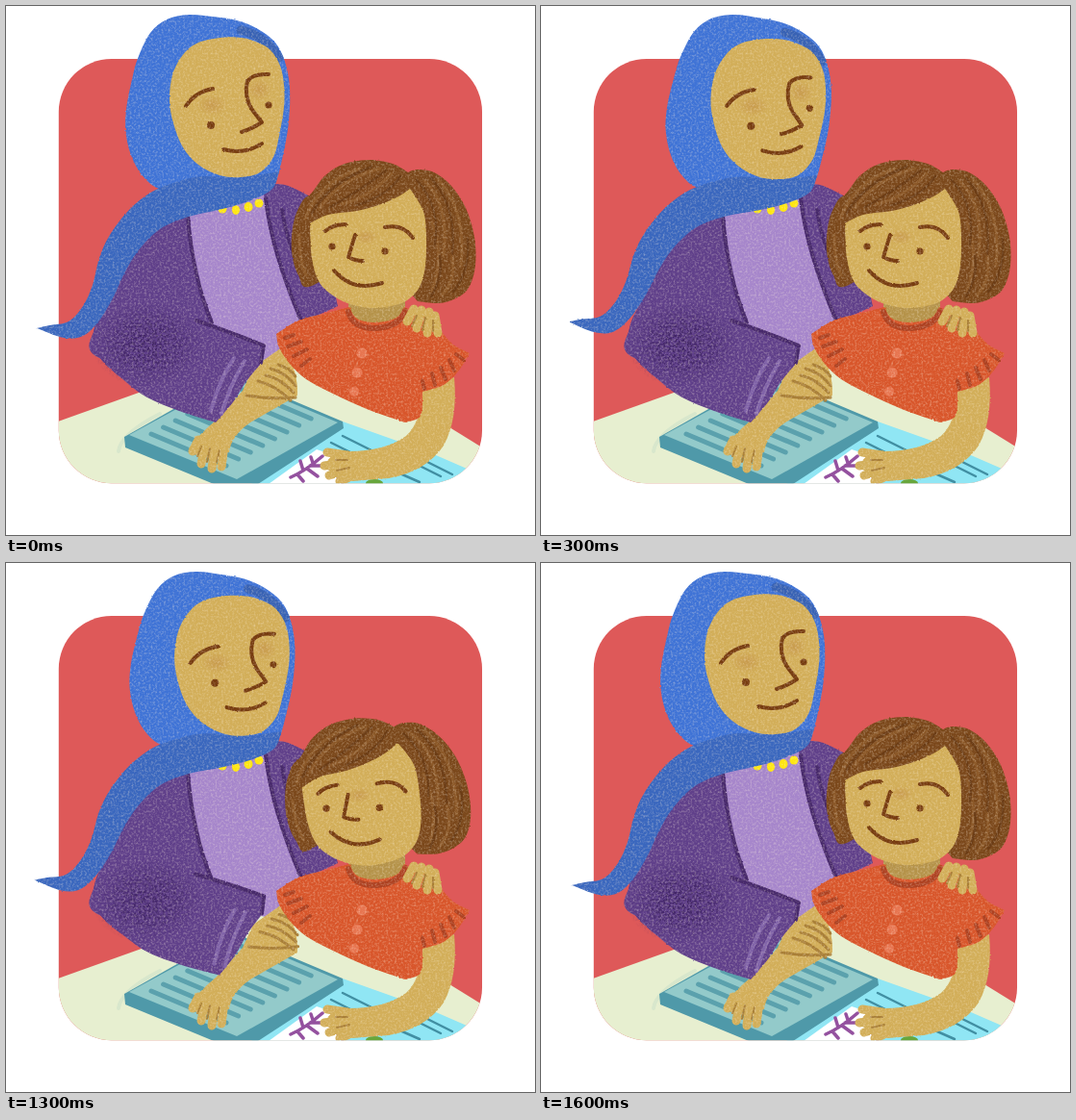
Write an HTML page that moves like this. It is 550x550 px and loops after 2900 ms.

```html
<!DOCTYPE html>
<html lang="en">
<head>
<meta charset="utf-8">
<title>Reading together</title>
<style>
html, body { margin: 0; height: 100%; overflow: hidden; background: #fff; }
svg { display: block; width: 550px; height: 550px; }
.line { fill: none; stroke-width: 4; stroke-linecap: round; stroke-linejoin: round; }
.skin { fill: #d2ae59; }
.finger { stroke: #d2ae59; stroke-width: 9; }
.ink { stroke: #773c10; }
.dot { fill: #773c10; }
.fold { stroke: #a97f37; stroke-width: 3; }
.jacket { fill: #60408a; }
.seam { stroke: #47296b; stroke-width: 4; }
.hair { fill: #7b481b; }
.strand { stroke: #8c5929; stroke-width: 3; }
.shade { stroke: #6b3c15; stroke-width: 2.5; }
.teal { stroke: #5ba1ad; stroke-width: 5; }
.pleat { stroke: #ae4222; stroke-width: 4; }
</style>
</head>
<body>
<svg viewBox="0 0 550 550">
  <defs>
    <clipPath id="card"><rect x="54.8" y="55" width="440.2" height="441.2" rx="55"/></clipPath>
    <filter id="grain" filterUnits="userSpaceOnUse" x="0" y="0" width="550" height="550" color-interpolation-filters="sRGB">
      <feTurbulence type="fractalNoise" baseFrequency=".45" numOctaves="2" seed="4" result="noise"/>
      <feDisplacementMap in="SourceGraphic" in2="noise" scale="2" xChannelSelector="R" yChannelSelector="G" result="art"/>
      <feColorMatrix in="noise" values="0 0 0 0 1  0 0 0 0 .95  0 0 0 0 .88  .8 0 0 0 -.36"/>
      <feComposite in2="art" operator="atop"/>
    </filter>
    <filter id="speck" filterUnits="userSpaceOnUse" x="0" y="0" width="550" height="550" color-interpolation-filters="sRGB">
      <feTurbulence type="fractalNoise" baseFrequency=".4" numOctaves="2" seed="9"/>
      <feColorMatrix values="0 0 0 0 0  0 0 0 0 0  0 0 0 0 0  5 0 0 0 -2.1" result="dots"/>
      <feComposite in="SourceGraphic" in2="dots" operator="in"/>
    </filter>
    <radialGradient id="dusk"><stop stop-color="#3d2162"/><stop offset=".5" stop-color="#3d2162" stop-opacity=".7"/><stop offset="1" stop-color="#3d2162" stop-opacity="0"/></radialGradient>
    <radialGradient id="blush"><stop stop-color="#b97f3d" stop-opacity=".4"/><stop offset="1" stop-color="#b97f3d" stop-opacity="0"/></radialGradient>
  </defs>

  <g clip-path="url(#card)">
    <path fill="#de5959" d="M54 55H495V497H54z"/>
    <path fill="#e7efd0" d="M54 432L138 402 300 345 440 425 495 459V497H54z"/>

    <!-- books -->
    <path class="line" stroke="#d8e7cc" stroke-width="6" d="M117 463Q119 445 160 424"/>
    <path fill="#90e6f4" d="M350 432L440 464 486 484 478 497H255z"/>
    <path class="line" stroke="#418fa3" style="stroke-width:2.5" d="M350 447L386 465M338 454L362 466M402 459L432 471M418 472L452 489M430 470L464 487M405 484L430 495"/>
    <path fill="#fff" d="M323 461L368 476 352 497H273z"/>
    <path class="line" stroke="#94519f" style="stroke-width:3.5" d="M296 490Q312 483 329 468M309 483L306 473M316 478L330 478M303 487L309 494M319 475L317 469M313 481L324 489M344 488L350 495"/>
    <ellipse cx="383" cy="496" rx="9" ry="4" fill="#68a63c"/>
    <path fill="#4f99a9" d="M123 448L236 384 350 432 351 439 262 497H216L124 459z"/>
    <path fill="#93caca" d="M128 446L236 387 345 433 240 492z"/>
    <path id="rows" class="line teal"/>
  </g>

  <g filter="url(#grain)">
    <!-- woman: body -->
    <g clip-path="url(#card)">
      <path fill="#a686cb" d="M178 204L272 192 292 270 318 334 285 372 200 350z"/>
      <path class="jacket" data-through="264,186! 290,186 318,199! 332,250 345,312! 308,329! 285,270 270,202!"/>
      <path class="line seam" d="M270 200Q276 255 307 327M287 212Q292 245 304 268"/>
      <path class="jacket" data-through="189,212! 152,226 124,262 105,305 92,335 95,365 190,390! 214,330! 197,282 189,218!"/>
      <path class="line seam" d="M189 218Q194 282 214 329"/>
      <g fill="#ffe610"><circle cx="225" cy="211" r="4.5"/><ellipse cx="239" cy="212" rx="4" ry="5"/><ellipse cx="252" cy="209" rx="4.5" ry="5"/><circle cx="263" cy="205" r="4.5"/></g>

      <path class="skin" d="M288 354Q304 378 303 405Q280 418 254 433Q234 447 232 464L200 469 190 460Q202 444 218 431L246 400 257 376z"/>
      <path class="line finger" d="M200 451L194 463M207 455L203 476M217 457L214 481M227 457L224 479"/>
      <path class="line fold" style="stroke-width:2" d="M203 458L199 468M212 460L209 474M222 462L219 474"/>
      <g id="sleeve">
        <path class="jacket" data-through="120,285! 102,312 92,335 91,352 100,369 120,387 145,406 180,421 218,433! 236,412 250,390 265,372! 268,352! 240,342 210,330 190,300!"/>
        <ellipse cx="147" cy="352" rx="58" ry="44" fill="url(#dusk)" filter="url(#speck)"/>
        <path class="line" stroke="#8063a8" stroke-width="3" d="M237 366Q222 388 213 421M248 369Q233 394 224 424"/>
        <path class="line seam" d="M198 327Q230 338 268 353L265 371"/>
        <path class="line fold" d="M250 405Q275 409 301 407M262 390Q281 395 296 410M270 384Q285 387 299 402M275 377Q291 381 301 395M283 373Q294 376 301 385"/>
      </g>
    </g>

    <!-- woman: head and scarf -->
    <g id="head">
      <path fill="#3f73d6" data-through="132,72 138,52 150,28 167,14 190,9 215,11 240,15 262,24 280,38 290,58 295,85 294,120 288,155 280,182 262,196 220,202 165,192 145,180 132,160 125,135 125,108"/>
      <path fill="#3a67be" data-through="284,172! 277,190 255,202 225,211 190,219 160,232 137,255 122,280 112,302 97,327 80,343 60,345 32,335! 45,332 65,328 80,312 90,290 97,262 108,238 128,212 152,193 180,182 205,177 245,178"/>
      <path class="line" stroke="#3862b4" style="stroke-width:9" d="M244 25Q270 31 284 54"/>
      <path class="skin" data-through="170,98 173,72 183,52 198,39 222,33 245,33 262,38 275,46 285,62 289,82 289,105 284,135 278,157 264,173 244,178 222,176 200,165 184,147 174,122"/>
      <ellipse cx="214" cy="103" rx="16" ry="11" fill="url(#blush)"/>
      <ellipse cx="263" cy="87" rx="13" ry="12" fill="url(#blush)"/>
      <path class="line ink" d="M187 104Q197 89 215 86M273 71Q257 70 251 78Q247 94 256 108L266 121Q255 128 245 131M226 149Q248 155 266 143"/>
      <circle class="dot" cx="213" cy="124" r="4"/><circle class="dot" cx="273" cy="103" r="3.5"/>
    </g>

    <!-- girl: body -->
    <g clip-path="url(#card)">
      <path class="skin" d="M430 397L466 386Q470 430 455 457Q437 484 398 491L360 494 332 481Q333 466 352 463Q392 464 416 447Q434 430 430 397z"/>
      <path class="line finger" d="M355 467L334 464M352 475L331 478M357 482L336 488M365 487L347 494"/>
      <path class="line fold" style="stroke-width:2" d="M343 472L355 472M344 483L357 480"/>
      <path fill="#b5934a" d="M356 295H415V332H356z"/>
      <path fill="#d8562b" data-through="357,313! 330,320 304,327 281,341! 284,355 295,372 312,388 340,403 375,419 415,433! 431,426 433,401! 455,394 470,380 482,361! 465,352 452,338 441,325 414,313! 406,324 385,329 365,325"/>
      <path class="line pleat" style="stroke-width:6" d="M356 318Q361 336 385 335Q410 333 415 317"/>
      <path class="line pleat" d="M290 345L299 342M293 354L307 349M299 364L313 357M307 374L316 367M433 390L435 398M443 382L446 394M452 376L457 388M461 368L466 379M468 362L476 368"/>
      <g fill="#e77550"><circle cx="370" cy="361" r="5.5"/><circle cx="365" cy="381" r="5.5"/><circle cx="362" cy="401" r="5"/></g>
      <path class="line finger" d="M424 315L417 328M432 316L427 335M440 318L438 340M446 322L449 340"/>
      <path class="line fold" style="stroke-width:2" d="M427 322L422 333M436 324L433 337M444 327L444 338"/>
    </g>

    <!-- girl: head -->
    <g id="girl">
      <path class="hair" data-through="318,291 304,280 297,255 299,225 308,203 318,194 332,176 352,164 378,160 402,164 418,173! 427,170 445,173 463,187 478,210 487,240 488,270 481,293 468,304 450,309 428,307! 380,250!"/>
      <path class="skin" data-through="316,226! 335,217 365,213 390,206 408,198 420,190! 428,202 435,217 437,240 436,270 430,292 417,306 400,312 378,314 355,309 337,299 325,286 318,262"/>
      <path class="line strand" d="M311 221Q325 183 368 169M326 211Q345 181 389 169M349 206Q378 199 401 174M435 182Q461 205 455 259M449 180Q479 212 473 270M443 225Q456 258 443 296M305 238Q304 262 312 280M464 261Q468 285 453 301"/>
      <path class="line shade" d="M318 215Q336 184 380 167M337 209Q368 192 395 171M365 207Q397 197 410 177M427 181Q452 208 446 248M442 179Q469 209 464 257M480 242Q483 275 465 297M451 260Q455 280 442 302"/>
      <ellipse cx="374" cy="240" rx="13" ry="8" fill="url(#blush)"/>
      <path class="line ink" d="M332 234Q340 227 353 227M394 230Q413 226 423 241M363 238L356 261Q363 265 371 265M341 275Q361 298 391 288"/>
      <g id="open"><circle class="dot" cx="339" cy="250" r="3.6"/><circle class="dot" cx="394" cy="255" r="3.6"/></g>
      <path id="shut" class="line ink" style="stroke-width:3" d="M334 249L344 251M389 254L400 256"/>
    </g>
  </g>
</svg>
<script>
const $ = id => document.getElementById(id);
const LOOP = 2900, STEP = 100;
const leanIn = [0, .33, .67, .85, .95, 1];
const leanOut = [.67, .33, .12, 0];

// Closed smooth curve through points "x,y"; a "!" marks a sharp corner.
function smooth(text) {
  const pts = text.split(' ').flatMap(p => {
    const [x, y] = p.split(',').map(parseFloat);
    return p.endsWith('!') ? [[x, y], [x, y]] : [[x, y]];
  });
  const at = i => pts[(i + pts.length) % pts.length];
  const handle = (p, a, b) => p.map((v, k) => v + (b[k] - a[k]) / 6);
  let d = 'M' + pts[0];
  pts.forEach((p, i) => {
    const q = at(i + 1);
    if (p[0] === q[0] && p[1] === q[1]) return;
    d += `C${handle(p, at(i - 1), q)} ${handle(q, at(i + 2), p)} ${q}`;
  });
  return d + 'z';
}
document.querySelectorAll('[data-through]').forEach(el => el.setAttribute('d', smooth(el.dataset.through)));

// Lines of writing across the page
let rows = '';
for (let i = 0; i < 8; i++) rows += `M${151 + i * 12.6} ${445 - i * 7}l78 33`;
$('rows').setAttribute('d', rows);

const lean = s => s < 13 ? leanIn[Math.min(s, 5)] : leanOut[Math.min(s - 13, 3)];
const show = (id, on) => $(id).setAttribute('visibility', on ? 'visible' : 'hidden');
const move = (id, transform) => $(id).setAttribute('transform', transform);

function pose(s) {
  const nod = s >= 7 && s < 14, blink = s >= 7 && s < 13;
  move('head', `rotate(${2.8 * lean(s)} 195 253)`);
  move('girl', nod ? 'translate(-1 0) rotate(-6 385 300)' : '');
  move('sleeve', nod ? 'rotate(-2.6 120 345)' : '');
  show('open', !blink);
  show('shut', blink);
}

let last = -1;
const start = performance.now();
function tick() {
  const s = Math.floor((performance.now() - start) % LOOP / STEP);
  if (s !== last) pose(last = s);
  requestAnimationFrame(tick);
}
tick();
</script>
</body>
</html>
```
